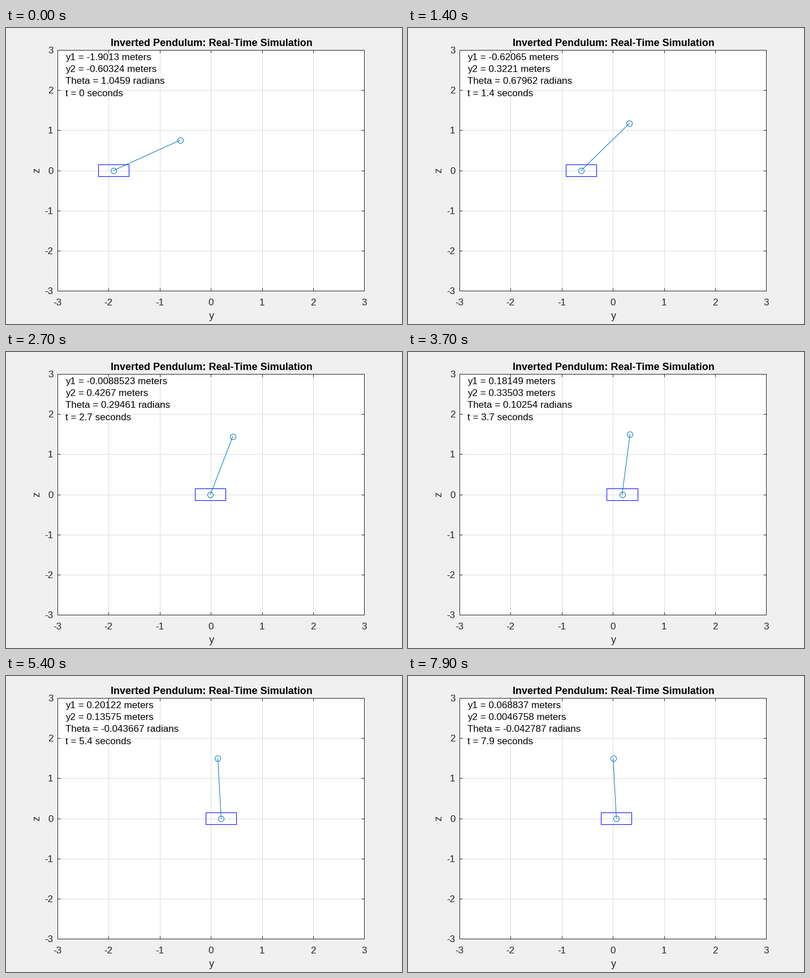
A matplotlib script that plays this animation: 700 px wide and 525 px high, repeating every 8 s.

```python
import numpy as np
import matplotlib.pyplot as plt
from matplotlib.animation import FuncAnimation
from matplotlib.patches import Rectangle

W, H, DPI = 700, 525, 100
FRAMES, STEP = 80, 100          # count, ms
LEFT, RIGHT, TOP, BOTTOM = 90.87, 633.37, 38.8, 466.4   # axes box, px
ROD, CART_W, CART_H = 1.5, 0.6, 0.3
DARK, BLUE = "#262626", "#0072bd"

plt.rcParams["font.family"] = "Liberation Sans"


def px(n):
    """Pixels to points."""
    return n * 72 / DPI


def clamped_spline(t, v, start, end):
    """Cubic spline through (t, v) with given end slopes."""
    t, v = np.array(t), np.array(v)
    h = np.diff(t)
    s = np.diff(v) / h
    n = len(t)
    A, b = np.eye(n), np.zeros(n)
    b[0], b[-1] = start, end
    for i in range(1, n - 1):
        A[i, i - 1:i + 2] = 1 / h[i - 1], 2 / h[i - 1] + 2 / h[i], 1 / h[i]
        b[i] = 3 * (s[i - 1] / h[i - 1] + s[i] / h[i])
    m = np.linalg.solve(A, b)

    def at(x):
        i = int(np.clip(np.searchsorted(t, x, side="right") - 1, 0, n - 2))
        d = x - t[i]
        c2 = (3 * s[i] - 2 * m[i] - m[i + 1]) / h[i]
        c3 = (m[i] + m[i + 1] - 2 * s[i]) / h[i] ** 2
        return v[i] + d * (m[i] + d * (c2 + d * c3))

    return at


KNOTS = [0, 0.9, 1.4, 1.8, 2.7, 3.7, 5.4, 6.7, 7.9]
cart_at = clamped_spline(
    KNOTS,
    [-1.9013, -1.025, -0.62065, -0.371, -0.0088523,
     0.18149, 0.2012249, 0.135138, 0.0688367],
    0.99, -0.051)
theta_at = clamped_spline(
    KNOTS,
    [1.04589, 0.873, 0.67962, 0.533, 0.29461,
     0.10254, -0.043667, -0.058646, -0.042787],
    -0.026, 0.019)

fig = plt.figure(figsize=(W / DPI, H / DPI), dpi=DPI, facecolor="#f0f0f0")
ax = fig.add_axes([LEFT / W, 1 - BOTTOM / H,
                   (RIGHT - LEFT) / W, (BOTTOM - TOP) / H])
ax.set(xlim=(-3, 3), ylim=(-3, 3), xticks=range(-3, 4), yticks=range(-3, 4))
ax.set_axisbelow(True)
ax.grid(color="#dcdcdc", lw=px(1))
ax.tick_params(direction="in", length=px(5.4), width=px(1), color=DARK,
               top=True, right=True, labelbottom=False, labelleft=False)
for side in ax.spines.values():
    side.set(linewidth=px(1), color=DARK)


def label(x, y, s, size=17, color=DARK, **kw):
    """Text with its baseline at pixel (x, y) from the top left."""
    return fig.text(x / W, 1 - y / H, s, fontsize=px(size), color=color,
                    va="baseline", **kw)


for k, x, y in zip(range(-3, 4), np.linspace(LEFT, RIGHT, 7),
                   np.linspace(BOTTOM, TOP, 7)):
    label(x, 492, str(k), ha="center")
    label(83.5, round(y) + 6, str(k), ha="right")
label(363, 32, "Inverted Pendulum: Real-Time Simulation", 18, "black",
      ha="center", weight="bold")
label(363, 516, "y", 18, ha="center")
label(59, 253, "z", 18, ha="center", rotation=90, rotation_mode="anchor")

info = [label(105, int(57 + 21.4 * i), "", color="black") for i in range(4)]
cart = ax.add_patch(Rectangle((0, -CART_H / 2), CART_W, CART_H, fill=False,
                              ec="#0000ff", lw=px(1), zorder=3))
rod, = ax.plot([], [], "-o", color=BLUE, lw=px(1), ms=px(10), mfc="none",
               mew=px(1), zorder=4)


def draw(i):
    t = i * STEP / 1000
    y1, theta = cart_at(t), theta_at(t)
    y2 = y1 + ROD * np.sin(theta)
    cart.set_x(y1 - CART_W / 2)
    rod.set_data([y1, y2], [0, ROD * np.cos(theta)])
    lines = (f"y1 = {y1:.5g} meters", f"y2 = {y2:.5g} meters",
             f"Theta = {theta:.5g} radians", f"t = {t:.5g} seconds")
    for text, s in zip(info, lines):
        text.set_text(s)
    return [cart, rod, *info]


anim = FuncAnimation(fig, draw, frames=FRAMES, interval=STEP, repeat=True,
                     repeat_delay=0)
plt.show()
```
